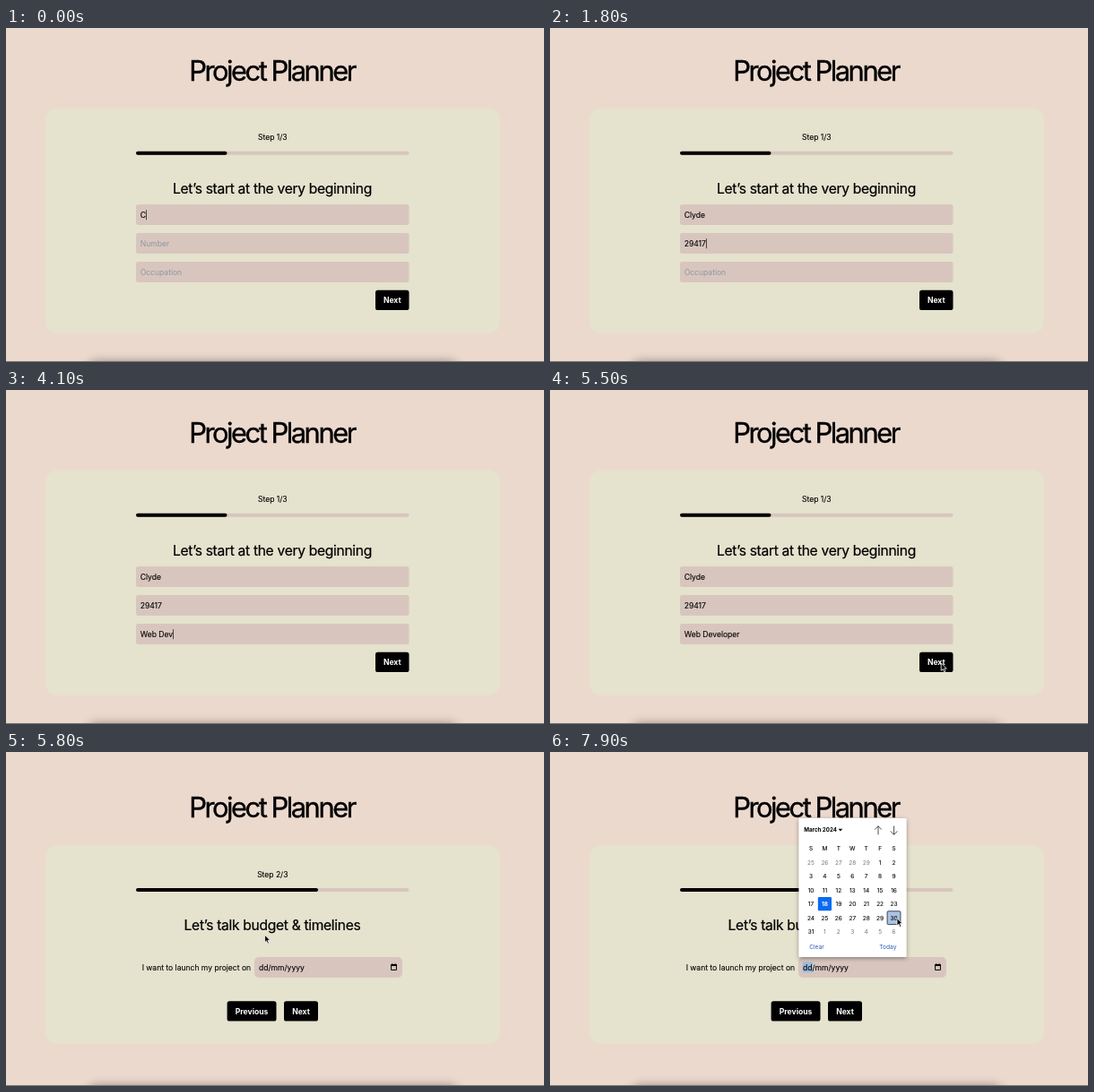
An HTML page that plays this animation: 600x373 px, repeating every 8000 ms.

```html
<!DOCTYPE html>
<html lang="en">
<head>
<meta charset="utf-8">
<title>Project Planner</title>
<style>
  html, body { margin: 0; width: 100%; height: 100%; overflow: hidden; background: #ecd9ce; }
  svg { display: block; width: 600px; height: 373px; }
  text {
    font: 400 8.6px Inter, "Open Sans", sans-serif;
    font-optical-sizing: none;
    letter-spacing: -.03px;
    white-space: pre;
    stroke: #000;
    stroke-width: .1px;
  }
  .title { font-size: 31px; letter-spacing: -2.54px; stroke-width: .35px; }
  .heading { font-size: 15.6px; letter-spacing: -.31px; stroke-width: .22px; }
  .mid { text-anchor: middle; }
  .btn { font-weight: 700; fill: #fff; stroke: none; text-anchor: middle; }
  .hint { fill: #8e97a5; stroke: none; }
  .day { font-size: 6.5px; letter-spacing: 0; text-anchor: middle; }
  .out { fill: #757575; stroke: none; }
  .month { font-size: 6.2px; font-weight: 700; letter-spacing: 0; stroke: none; }
  .link { font-size: 6.6px; letter-spacing: 0; fill: #2a5cb8; stroke: none; }
</style>
</head>
<body>
<svg id="stage" viewBox="0 0 600 373"></svg>
<script>
const LOOP = 8000;
const STEP_TWO = 5600, FOCUS_DATE = 7000, OPEN_CALENDAR = 7200, PICK_DAY = 7800;

const rect = (x, y, w, h, r, fill, more = "") =>
  `<rect x="${x}" y="${y}" width="${w}" height="${h}" rx="${r}" fill="${fill}" ${more}/>`;
const text = (x, y, s, cls = "", more = "") =>
  `<text x="${x}" y="${y}" class="${cls}" ${more}>${s}</text>`;
const button = (x, y, w, label) =>
  rect(x, y, w, 22.3, 2.6, "#000") + text(x + w / 2, y + 14.3, label, "btn");

// Title, card and progress bar shared by both steps
function panel(dy, height, step, heading) {
  return text(296.5, 58.6 + dy, "Project Planner", "title mid") +
    rect(44, 89.5 + dy, 507, height, 13, "#e5e2ce") +
    text(297.3, 125.4 + dy, `Step ${step}/3`, "mid") +
    rect(145, 137.7 + dy, 304.5, 4, 2, "#d8c6be") +
    rect(145, 137.7 + dy, 304.5 * step / 3, 4, 2, "#000") +
    text(297, 184.6 + dy, heading, "heading mid");
}

// Each key time is when one more letter is present
const fields = [
  { hint: "Name", value: "Clyde", keys: [0, 100, 300, 400, 600], from: 0, to: 1000 },
  { hint: "Number", value: "29417", keys: [1400, 1500, 1600, 1700, 1800], from: 1000, to: 2000 },
  { hint: "Occupation", value: "Web Developer", from: 2000, to: STEP_TWO,
    keys: [3200, 3300, 3500, 3600, 3700, 3800, 4000, 4300, 4500, 4600, 4700, 4800, 5000] }
];

function stepOne() {
  const rows = fields.map((f, i) => {
    const y = 197 + 32 * i;
    return rect(145, y, 304.5, 23, 2.2, "#d8c6be") +
      text(149.7, y + 14.8, "", "", `id="field${i}"`) +
      rect(0, y + 6.2, .8, 11, 0, "#222", `id="caret${i}"`);
  });
  return panel(0, 251.5, 1, "Let’s start at the very beginning") +
    rows.join("") + button(412, 292.8, 37.5, "Next");
}

function stepTwo() {
  const icon = `<path d="M429.6 237.6h5.8v5.8h-5.8z" fill="none" stroke="#000"/>
    <path d="M429.2 237h6.6v2h-6.6zM430.4 236.2h1v1h-1zM433.6 236.2h1v1h-1z"/>`;
  return panel(14.4, 222, 2, "Let’s talk budget &amp; timelines") +
    text(151.7, 244, "I want to launch my project on") +
    rect(277, 229, 165, 23, 5, "#d8c6be") +
    rect(281.8, 234.6, 11.2, 11.6, 0, "#9abbdf", `id="focus"`) +
    text(282, 244, "dd/mm/yyyy") + icon +
    button(246.6, 278.3, 54.9, "Previous") + button(310, 278.3, 38, "Next");
}

function calendar() {
  const col = i => 291 + 15.42 * i, row = i => 123.2 + 15.5 * i;
  let out = rect(277.5, 74, 120, 155, 1, "#fff", `filter="url(#drop)"`) +
    text(283.2, 89.3, "March 2024", "month") +
    `<path d="M321.6 85.8h4.6l-2.3 2.7z"/>
     <path d="M366 92.4v-9.6m-3.8 3.8l3.8-3.9l3.8 3.9M383.6 82.6v9.6m-3.8-3.8l3.8 3.9l3.8-3.9"
       fill="none" stroke="#222" stroke-width=".8"/>`;
  [..."SMTWTFS"].forEach((d, i) => out += text(col(i), 109.6, d, "day"));
  out += rect(col(1) - 7.6, row(3) - 7.6, 15.2, 15.2, 1, "#0b6bf0") +
    rect(col(6) - 7.4, row(4) - 7.4, 14.8, 14.8, 1, "#abc2e0",
      `stroke="#26364e" stroke-width=".9" id="picked"`);
  for (let i = 0; i < 42; i++) {
    const n = i - 4; // the 1st falls on a Friday
    const label = n < 1 ? n + 29 : n > 31 ? n - 31 : n;
    const style = n === 18 ? `style="fill:#fff;stroke:none;font-weight:700"` : "";
    out += text(col(i % 7), row(Math.floor(i / 7)) + 2.4, label,
      n < 1 || n > 31 ? "day out" : "day", style);
  }
  return out + text(289.2, 219.7, "Clear", "link") + text(367.3, 219.7, "Today", "link");
}

const stage = document.getElementById("stage");
stage.innerHTML = `
  <defs>
    <filter id="soft" x="-10%" y="-100%" width="120%" height="300%"><feGaussianBlur stdDeviation="6"/></filter>
    <filter id="drop" x="-10%" y="-10%" width="120%" height="125%">
      <feDropShadow dx="0" dy="1.5" stdDeviation="2.5" flood-opacity=".38"/>
    </filter>
  </defs>
  ${rect(0, 0, 600, 373, 0, "#ecd9ce")}
  <g id="one">${stepOne()}</g>
  <g id="two">${stepTwo()}</g>
  ${rect(92, 373, 411, 30, 8, "#000", `opacity=".42" filter="url(#soft)"`)}
  ${rect(0, 372, 600, 1, 0, "#7d7470")}
  <g id="calendar">${calendar()}</g>
  <path id="pointer" d="M0 0v8.4l1.9-1.8 1.4 3.2 1.5-.7-1.4-3.1h2.7z"
    fill="#000" stroke="#fff" stroke-width=".8" stroke-linejoin="round"/>`;

const $ = id => document.getElementById(id);
const show = (id, on) => $(id).setAttribute("visibility", on ? "visible" : "hidden");

// time, x, y
const path = [
  [5400, 436.2, 305], [5580, 436.2, 305], [5800, 288.6, 204.3], [6200, 288.6, 204.3],
  [6500, 330, 216], [6850, 429.2, 242.8], [7250, 429.2, 242.8],
  [7500, 412, 215], [7750, 387, 185.6], [8000, 387, 185.6]
];
const ease = u => u * u * (3 - 2 * u);

function pointerAt(t) {
  const i = path.findIndex(p => p[0] > t);
  if (i < 1) return null;
  const [t0, x0, y0] = path[i - 1], [t1, x1, y1] = path[i];
  const u = ease((t - t0) / (t1 - t0));
  return [x0 + (x1 - x0) * u, y0 + (y1 - y0) * u];
}

function drawField(f, i, t) {
  const count = f.keys.filter(k => k <= t).length;
  const el = $("field" + i);
  el.textContent = count ? f.value.slice(0, count) : f.hint;
  el.setAttribute("class", count ? "" : "hint");
  const last = Math.max(f.from, f.keys[count - 1] ?? 0);
  const on = t >= f.from && t < f.to && (t - last) % 1000 < 500;
  show("caret" + i, on);
  if (on) $("caret" + i).setAttribute("x", 149.8 + (count ? el.getComputedTextLength() : 0));
}

function draw(t) {
  const second = t >= STEP_TWO;
  $("one").style.display = second ? "none" : "";
  $("two").style.display = second ? "" : "none";
  $("calendar").style.display = t >= OPEN_CALENDAR ? "" : "none";
  if (!second) fields.forEach((f, i) => drawField(f, i, t));
  show("focus", second && t >= FOCUS_DATE);
  show("picked", t >= PICK_DAY);
  const p = pointerAt(t);
  show("pointer", p);
  if (p) $("pointer").setAttribute("transform", `translate(${p})`);
}

const start = performance.now();
function tick(now) {
  draw(Math.max(0, now - start) % LOOP);
  requestAnimationFrame(tick);
}
draw(0);
requestAnimationFrame(tick);
</script>
</body>
</html>
```
